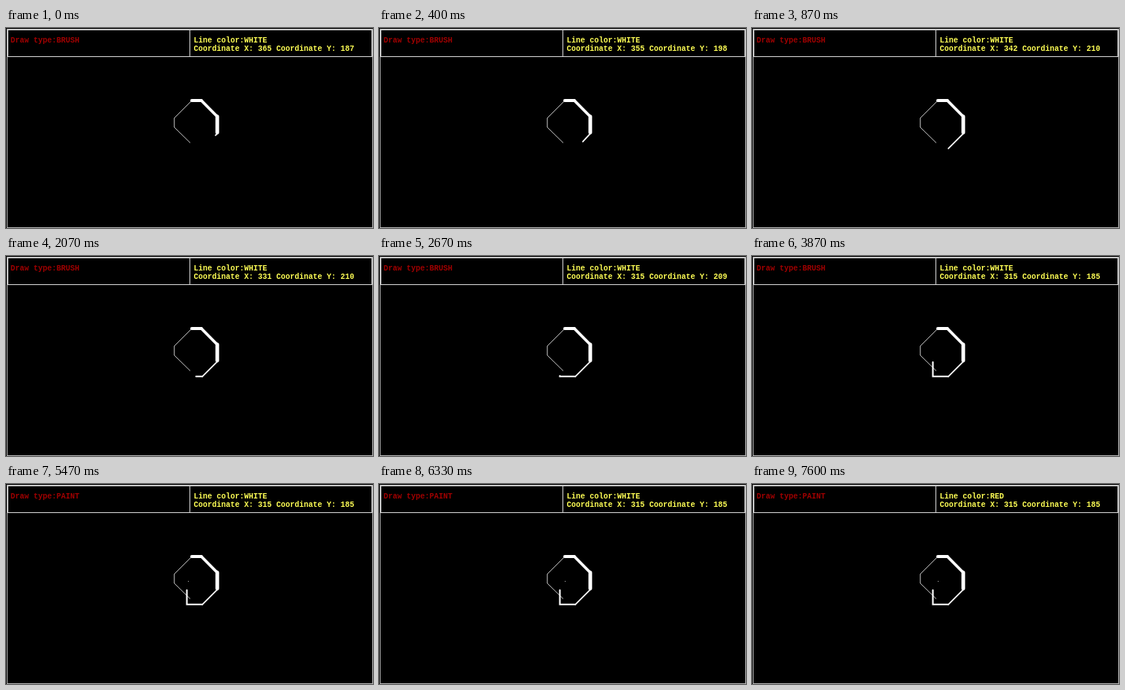
These frames come from a looping animation (480x262 px, 8000 ms). An HTML page with a canvas:

```html
<!DOCTYPE html>
<html lang="en">
<head>
<meta charset="utf-8">
<title>Brush and paint</title>
<style>
  html, body { margin: 0; width: 100%; height: 100%; overflow: hidden; background: #000; }
  canvas { display: block; }
</style>
</head>
<body>
<canvas id="stage" width="480" height="262"></canvas>
<script>
const ctx = document.getElementById('stage').getContext('2d');
const LOOP = 8000, FPS = 15;
const SCALE = 0.75; // 640 x 350 drawing space on the 480 px stage

// 0 before tick a, 1 after tick b, even progress between
const ramp = (t, a, b) => Math.min(1, Math.max(0, (t - a) / (b - a)));

// Down-left, a tap and a long run left, then up
function brushAt(t) {
  const diagonal = 23 * ramp(t, 0, 13);
  return [
    Math.ceil(365 - diagonal - ramp(t, 18, 19) - 26 * ramp(t, 25.4, 39)),
    Math.round(187 + diagonal - ramp(t, 39, 40) - 24 * ramp(t, 45, 58))
  ];
}

// Up along the stroke, then five taps to the right, in stage pixels
function cursorAt(t) {
  const taps = Math.floor(5 * ramp(t, 79, 94));
  return [
    Math.round(237 + 1.2 * taps),
    Math.round(138 - ramp(t, 69, 70) - 10 * ramp(t, 72, 79))
  ];
}

function line(width, points, color = '#fff', cap = 'round') {
  ctx.strokeStyle = color;
  ctx.lineWidth = width;
  ctx.lineCap = cap;
  ctx.beginPath();
  points.forEach(([x, y]) => ctx.lineTo(x, y));
  ctx.stroke();
}

function label(text, x, y, color) {
  ctx.fillStyle = color;
  ctx.fillText(text, x, y);
}

function drawPanel(t, [x, y]) {
  ctx.lineWidth = 1;
  ctx.strokeStyle = '#b4b4b4';
  ctx.strokeRect(1.5, 1.5, 478, 260);
  ctx.strokeStyle = '#d8d8d8';
  ctx.strokeRect(2.5, 2.5, 238, 35);
  ctx.strokeRect(240.5, 2.5, 238, 35);

  ctx.font = 'bold 10px "Liberation Mono", monospace';
  label('Draw type:' + (t < 63 ? 'BRUSH' : 'PAINT'), 6, 19, '#a00000');
  label('Line color:' + (t < 113 ? 'WHITE' : 'RED'), 245.5, 19, '#ffff55');
  label(`Coordinate X: ${x} Coordinate Y: ${y}`, 245.5, 29.5, '#ffff55');
}

// Diagonals come out thinner because the nib widens along one axis only.
function drawFinished() {
  line(0.9, [[241, 150.5], [220.1, 130], [220.1, 118], [242.5, 95.6]], '#e0e0e0', 'butt');
  line(4, [[243, 95], [255.5, 95]]);
  line(3.7, [[255.5, 95], [276.3, 116]]);
  line(4.8, [[276.3, 116], [276.3, 137]]);
}

function drawStroke(t, tip) {
  const corners = [[368, 184]];
  for (const turn of [13, 39]) if (t > turn) corners.push(brushAt(turn));
  const points = [...corners, tip].map(p => p.map(v => v * SCALE + 0.3));
  line(1.7, points.slice(0, 2));
  if (points.length > 2) line(2.1, points.slice(1));
}

function draw(ms) {
  const t = Math.floor((ms + 4) * FPS / 1000);
  const tip = brushAt(t);

  ctx.fillStyle = '#000';
  ctx.fillRect(0, 0, 480, 262);
  drawPanel(t, tip);
  drawFinished();
  drawStroke(t, tip);

  if (t >= 65) {
    ctx.fillStyle = '#b0b0b0';
    ctx.fillRect(...cursorAt(t), 1, 1);
  }
}

const start = performance.now();
function loop() {
  draw((performance.now() - start) % LOOP);
  requestAnimationFrame(loop);
}
loop();
</script>
</body>
</html>
```
